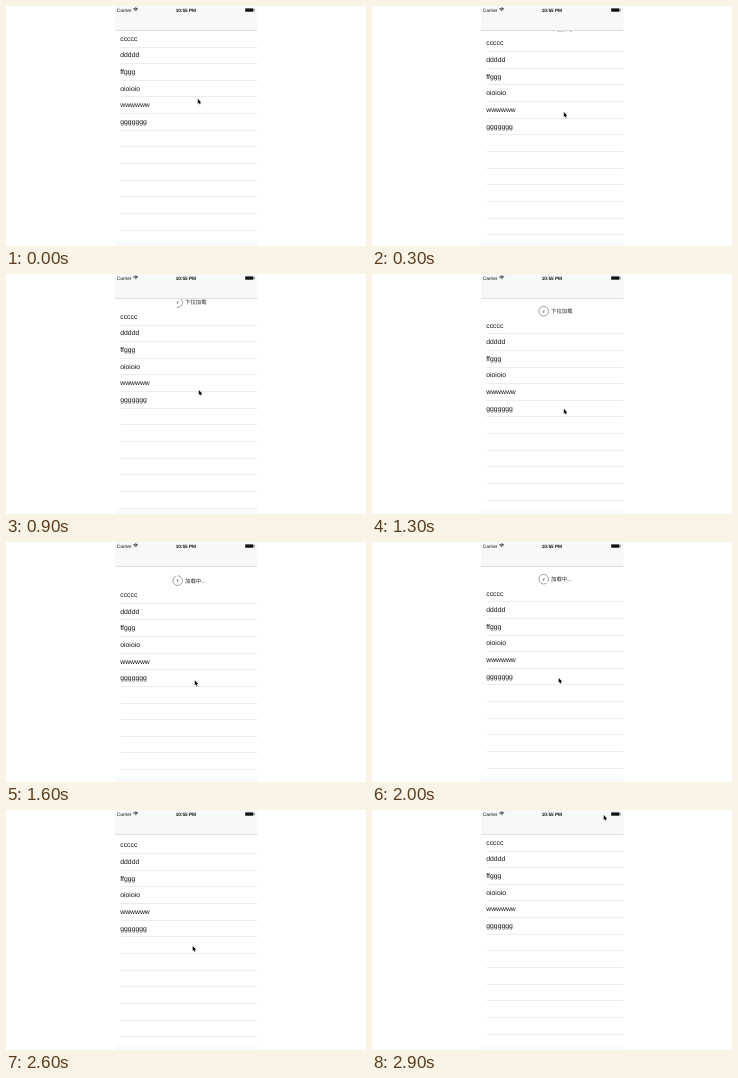
Animation, 360 px wide and 240 px high, one loop 3000 ms. Source, as an HTML page with a canvas:

```html
<!DOCTYPE html>
<html lang="zh">
<head>
<meta charset="utf-8">
<style>
  html, body { margin: 0; width: 100%; height: 100%; overflow: hidden; background: #fff; }
  canvas { display: block; }
</style>
</head>
<body>
<canvas id="stage" width="360" height="240"></canvas>
<script>
const ctx = document.getElementById('stage').getContext('2d');
const LOOP = 3000, STEP = 100;
const LEFT = 109, RIGHT = 251.5, NAV = 24, TAB = 235.6, ROW = 16.65, REST = 18.7;
const RELEASE = 1600, DONE = 2500;
const SANS = '"Liberation Sans", Arial, sans-serif';
const CJK = '"Noto Sans CJK SC", "Noto Sans CJK", sans-serif';
const rows = ['ccccc', 'ddddd', 'ffggg', 'oioioio', 'wwwwww', 'ggggggg'];

const ramp = (t, from, to) => Math.min(1, Math.max(0, (t - from) / (to - from)));
const smooth = u => u * u * (3 - 2 * u);

// The finger drags in three strokes; the list follows with resistance.
function pose(t) {
  const first = ramp(t, 0, 300), second = ramp(t, 300, 900), third = ramp(t, 900, 1300) ** 3;
  const settle = ramp(t, 1300, 1800), leave = smooth(ramp(t, 2600, 2900));
  const bounce = 1.5 * Math.sin(Math.PI * settle);
  const drag = 4.5 * first + 5.5 * second + 8.7 * third + bounce;
  return {
    x: 191.8 + second - third - 5.1 * settle + 45 * leave,
    y: 92.7 + 13.3 * first + 10 * second + 18.7 * third + 1.3 * settle + 2 * bounce - 131 * leave,
    pull: drag * (1 - smooth(ramp(t, 2400, 2660)))
  };
}

function text(str, x, y, font, color = '#111', align = 'left') {
  ctx.font = font;
  ctx.fillStyle = color;
  ctx.textAlign = align;
  ctx.fillText(str, x, y);
}

function box(x, y, w, h, color) {
  ctx.fillStyle = color;
  ctx.fillRect(x, y, w, h);
}

function arc(x, y, r, from, to, color, width) {
  ctx.beginPath();
  ctx.arc(x, y, r, from, to);
  ctx.strokeStyle = color;
  ctx.lineWidth = width;
  ctx.stroke();
}

function drawRefresh(t, pull) {
  const x = 171.7, y = 18.5 + pull;
  const loading = t >= RELEASE && t <= DONE;
  const part = loading ? 0.94 : Math.min(1, pull / REST);
  const turn = loading ? (t - RELEASE) / 1000 : 0;
  const start = (turn - 0.25) * Math.PI * 2;
  arc(x, y, 4.8, start, start + part * Math.PI * 2, '#777', 0.7);
  text('¥', x, y + 1.5, '4.2px ' + SANS, '#555', 'center');
  text(loading ? '加载中...' : '下拉加载', 179, y + 1.9, '500 5.4px ' + CJK, '#222');
}

function drawList(pull) {
  rows.forEach((row, i) => text(row, 114.3, 34.8 + pull + i * ROW, '6.8px ' + SANS));
  for (let y = 41 + pull; y < TAB + 2; y += ROW) {
    box(114.5, Math.floor(y), RIGHT - 114.5, 1, '#ededed');
  }
}

function drawBars() {
  box(LEFT, 0, RIGHT - LEFT, NAV, '#f8f8f8');
  box(LEFT, NAV, RIGHT - LEFT, 1, '#dedede');
  box(LEFT, TAB, RIGHT - LEFT, 240 - TAB, '#f9f9f9');

  text('Carrier', 110.8, 5.6, '4.8px ' + SANS);
  text('10:55 PM', 179.8, 5.6, 'bold 4.7px ' + SANS, '#111', 'center');
  for (let r = 0.7; r < 4; r += 1.3) {
    arc(129.7, 5.4, r, -Math.PI * 0.75, -Math.PI * 0.25, '#111', 0.8);
  }
  box(239.2, 2.4, 8.2, 3.3, '#111');
  box(247.9, 3.4, 0.7, 1.3, '#111');
}

function drawPointer(x, y) {
  const arrow = new Path2D('M0 0V5L1.2 4L2 5.8L2.8 5.4L2 3.7H3.5Z');
  ctx.save();
  ctx.translate(x, y);
  ctx.strokeStyle = '#fff';
  ctx.lineWidth = 0.7;
  ctx.stroke(arrow);
  ctx.fillStyle = '#000';
  ctx.fill(arrow);
  ctx.restore();
}

function draw(now) {
  const t = Math.floor(now % LOOP / STEP) * STEP;
  const { x, y, pull } = pose(t);
  box(0, 0, 360, 240, '#fff');
  if (pull > 0) drawRefresh(t, pull);
  drawList(pull);
  drawBars();
  drawPointer(x, y);
  requestAnimationFrame(draw);
}

ctx.textRendering = 'geometricPrecision';
requestAnimationFrame(draw);
</script>
</body>
</html>
```
